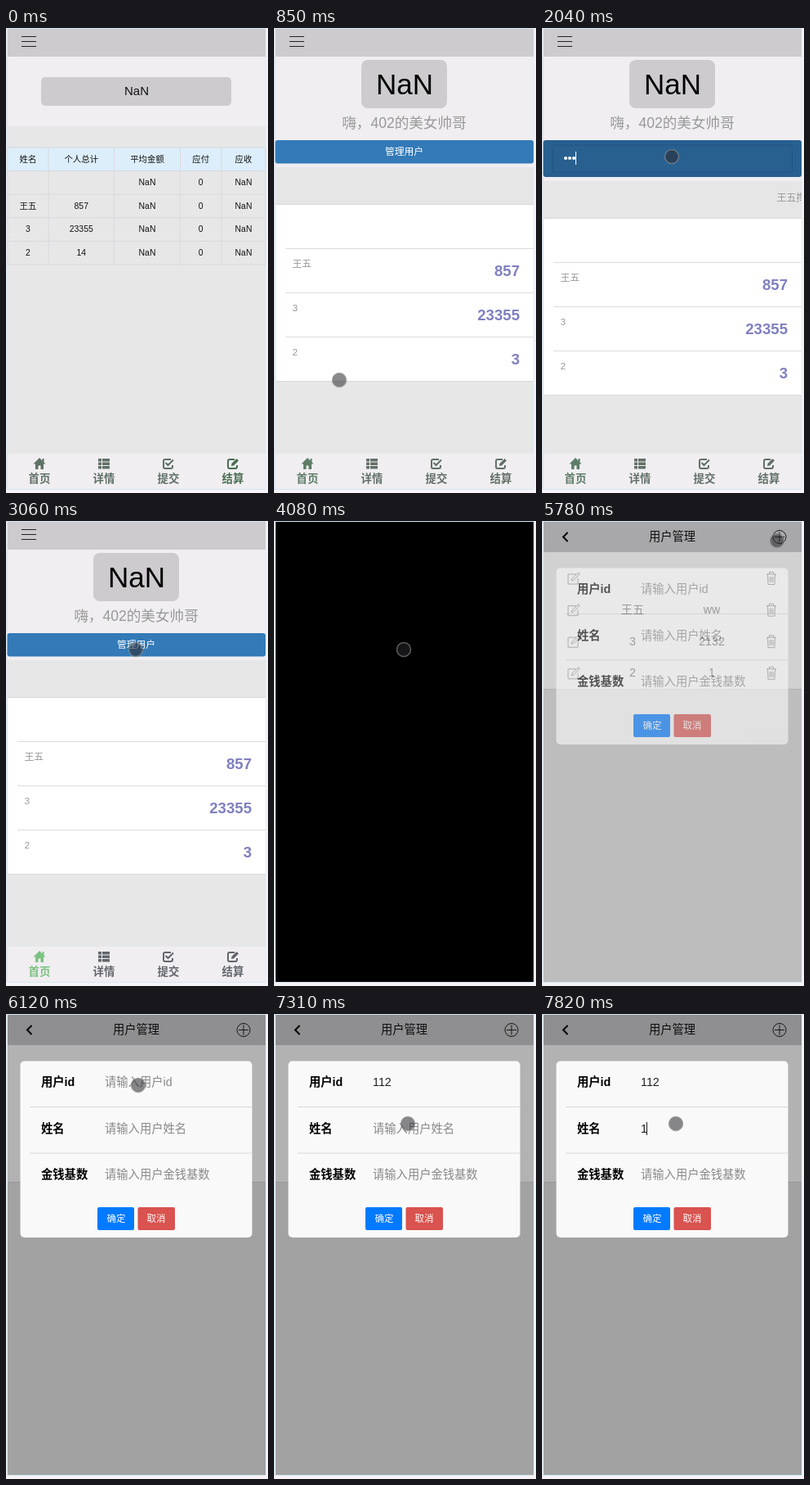
An HTML page for the animation above (8 s loop, 321 by 568 pixels).

```html
<!DOCTYPE html>
<html lang="zh-CN">
<head>
<meta charset="utf-8">
<title>用户管理</title>
<style>
  html, body { margin: 0; width: 100%; height: 100%; overflow: hidden; background: #f7f3f7; }
  svg { display: block; width: 321px; height: 568px; }
  text { font-family: "Liberation Sans", "Noto Sans CJK SC", sans-serif; white-space: pre; }
</style>
</head>
<body>
<svg id="stage" viewBox="0 0 321 568" xmlns="http://www.w3.org/2000/svg"></svg>
<script>
const LOOP = 8000;
const GREY = '#cdcbce', PALE = '#f0eef1', PAGE = '#e7e7e8', LINE = '#d9d9dc';

// Shape helpers
const rect = (x, y, x2, y2, fill, r = 0, extra = '') =>
  `<rect x="${x}" y="${y}" width="${x2 - x}" height="${y2 - y}" rx="${r}" fill="${fill}" ${extra}/>`;
const line = (d, color, w = 1) =>
  `<path d="${d}" fill="none" stroke="${color}" stroke-width="${w}"/>`;
// y is the visual middle of the text
const text = (s, x, y, size, fill = '#111', anchor = 'middle', weight = 400, id = '') =>
  `<text ${id && `id="${id}"`} x="${x}" y="${y + size * .36}" font-size="${size}" fill="${fill}"` +
  ` text-anchor="${anchor}" font-weight="${weight}">${s}</text>`;
const group = (id, body, extra = '') => `<g id="${id}" ${extra}>${body}</g>`;

const menu = line('M19 10.5H37M19 16.5H37M19 22.5H37', '#222', 1.2);

const icons = [
  '<path fill="currentColor" d="M-7.5 .5L0 -7 3.5 -3.6V-6H5.5V-1.6L7.5 .5H5V7H1.5V2.5H-1.5V7H-5V.5Z"/>',
  [-6, -1.5, 3].map(y => `<path fill="currentColor" d="M-7 ${y}h4v3.5h-4zM-2 ${y}h9v3.5h-9z"/>`).join(''),
  '<path fill="none" stroke="currentColor" stroke-width="2" d="M3 -5H-4Q-6 -5 -6 -3V4Q-6 6 -4 6H3Q5 6 5 4V2M-3.5 -1L-.5 2 6 -4.5"/>',
  '<path fill="none" stroke="currentColor" stroke-width="2" d="M2 -5H-4Q-6 -5 -6 -3V4Q-6 6 -4 6H3Q5 6 5 4V2"/>' +
  '<path fill="currentColor" d="M-2 3L-1.5 0 4.5 -6 7 -3.5 1 2.5Z"/>'
];
const tabs = ['首页', '详情', '提交', '结算'].map((s, i) =>
  `<g class="tab"><g transform="translate(${41 + i * 79} 532)">${icons[i]}</g>` +
  text(s, 41 + i * 79, 550.5, 13.4, 'currentColor', 'middle', 700) + '</g>').join('');

// Settlement page
const cols = [2, 52, 132.5, 213.5, 264, 318];
const rowY = i => 146 + i * 28.6;
const table = [
  ['姓名', '个人总计', '平均金额', '应付', '应收'],
  ['', '', 'NaN', '0', 'NaN'],
  ['王五', '857', 'NaN', '0', 'NaN'],
  ['3', '23355', 'NaN', '0', 'NaN'],
  ['2', '14', 'NaN', '0', 'NaN']
];
const settle = rect(2, 35, 318, 120, PALE) + rect(43, 60, 276, 95, GREY, 5) +
  text('NaN', 160, 77, 15) + rect(2, 146, 318, rowY(1), '#dceefa') +
  [0, 1, 2, 3, 4, 5].map(i => line(`M2 ${rowY(i)}H318M${cols[i]} 146V${rowY(5)}`, LINE)).join('') +
  table.map((row, r) => row.map((s, c) =>
    text(s, (cols[c] + cols[c + 1]) / 2, rowY(r) + 13.8, 10.4)).join('')).join('');

// Home page; the list is laid out below the closed button
const people = [['王五', '857'], ['3', '23355'], ['2', '3']];
const list = rect(2, 170, 318, 216, '#e6e6e7') + line('M2 215.5H318', LINE) +
  '<g clip-path="url(#screen)">' + text('王五掏了857元', 0, 191, 12, '#999', 'start', 400, 'ticker') + '</g>' +
  rect(2, 216, 318, 432, '#fff') + line('M2 431.5H318', LINE) +
  people.map(([name, sum], i) => {
    const y = 269.5 + i * 54;
    return line(`M14 ${y}H318`, '#dcdce0') + text(name, 22.5, y + 18, 11.8, '#999', 'start') +
      text(sum, 301, y + 26.5, 18.6, '#8080c0', 'end', 700);
  }).join('');
const home = rect(2, 35, 318, 187, PALE) + rect(107, 39, 212, 98, GREY, 8) +
  text('NaN', 160, 68, 35, '#000') + text('嗨，402的美女帅哥', 159.5, 115.5, 17.6, '#999') +
  group('list', list) +
  group('button', rect(1.5, 137, 318, 165.5, '#337ab7', 3) + text('管理用户', 159.5, 151, 11.8, '#fff')) +
  group('panel', rect(1.5, 137, 318, 182, '#286090', 3) +
    rect(13, 143, 306.5, 176, 'none', 2, 'stroke="#235580"') +
    [0, 1, 2].map(i => `<circle class="dot" cx="${29 + i * 5}" cy="159" r="2.1" fill="#fff"/>`).join('') +
    `<path id="caret" d="M0 151V167" stroke="#fff"/>`);

// User management page
const edit = y => line(`M42 ${y - 5}H32V${y + 7}H44V${y}M36 ${y + 3}L37 ${y}L45 ${y - 7}L46 ${y - 5}L39 ${y + 2}Z`, '#333', .9);
const bin = y => line(`M275 ${y - 5}H287M278.500 ${y - 5}V${y - 7.500}H283.500V${y - 5}` +
  `M276.500 ${y - 5}L277 ${y + 7.500}H285L285.500 ${y - 5}M279 ${y - 2}V${y + 5}M281 ${y - 2}V${y + 5}M283 ${y - 2}V${y + 5}`, '#333', .9);
const users = [['', ''], ['王五', 'ww'], ['3', '2132'], ['2', '1']];
const manage = rect(2, 1, 318, 38, GREY) + line('M31.5 14L26 19.5 31.5 25', '#000', 2) +
  text('用户管理', 159.5, 18.5, 14.3) +
  '<circle cx="291" cy="19.500" r="8" fill="none" stroke="#222"/>' + line('M285 19.5H297M291 13.5V25.5', '#222') +
  rect(2, 38, 318, 205, '#fff') + line('M2 205.5H318', LINE) +
  users.map(([name, base], i) => {
    const y = 70 + i * 38.6;
    return edit(y) + bin(y) + text(name, 111, y - .8, 14.2) + text(base, 208, y - .8, 14.2);
  }).join('');

const fields = [['用户id', '请输入用户id'], ['姓名', '请输入用户姓名'], ['金钱基数', '请输入用户金钱基数']];
const dialog = rect(17.5, 57.5, 301.5, 273, '#f9f9f9', 5) +
  line('M29 113.5H301M29 170H301', '#d8d8da') +
  fields.map(([label], i) => text(label, 43, 83 + i * 56.5, 14.3, '#000', 'start', 700) +
    text('', 121, 83 + i * 56.5, 14.3, '#888', 'start', 400, 'field' + i)).join('') +
  rect(112, 236, 157, 264, '#007aff', 2) + text('确定', 135, 250, 11.5, '#fff') +
  rect(161.5, 236, 207, 264, '#d9534f', 2) + text('取消', 184, 250, 11.5, '#fff') +
  '<path id="bar" d="M128.500 132V148" stroke="#222"/>';

const stage = document.getElementById('stage');
stage.innerHTML =
  '<clipPath id="screen"><rect x="2" y="1" width="316" height="562"/></clipPath>' +
  rect(1, .5, 318, 563.5, PAGE, 0, 'stroke="#d3e8f6"') +
  group('main', rect(2, 1, 318, 35, GREY) + menu + group('settle', settle) + group('home', home) +
    rect(2, 520, 318, 563, PALE) + tabs) +
  group('black', rect(2, 1, 318, 563, '#000')) +
  group('manage', manage) +
  group('shade', rect(2, 1, 318, 563, '#000')) +
  group('dialog', dialog) +
  '<circle id="touch" r="8.500" fill="rgba(40,40,45,.55)" stroke="rgba(140,140,140,.65)" stroke-width="1.500"/>';

const $ = id => document.getElementById(id);
const show = (el, on) => el.style.display = on ? '' : 'none';
const dots = [...document.querySelectorAll('.dot')];
const tabEls = [...document.querySelectorAll('.tab')];

// time, scene, touch point, details
const steps = [
  [0, 'settle', null, {}],
  [510, 'home', [41, 540], {}],
  [850, 'home', [80, 430], {}],
  [1020, 'home', [130, 260], {}],
  [1190, 'home', [159, 157], {}],
  [1360, 'home', [159, 157], { dots: 0 }],
  [1700, 'home', [159, 157], { dots: 1, ticker: 312 }],
  [1870, 'home', [159, 157], { dots: 2, ticker: 300 }],
  [2040, 'home', [159, 157], { dots: 3, ticker: 287.5 }],
  [2550, 'home', [159, 157], { dots: 3, ticker: 252 }],
  [2720, 'home', [159, 157], { lit: true }],
  [3060, 'home', [159, 157], { lit: true }],
  [4080, 'black', [159, 157], {}],
  [4420, 'manage', [274, 40], {}],
  [5270, 'manage', [288, 24], {}],
  [5780, 'manage', [288, 24], { shade: .6 }],
  [6120, 'manage', [162, 87], { shade: 1 }],
  [7310, 'manage', [164, 134], { shade: 1, values: ['112'] }],
  [7820, 'manage', [164, 134], { shade: 1, values: ['112', '1'] }]
];

function tabColor(i, scene, lit) {
  if (scene === 'settle') return i === 3 ? '#4a6f53' : '#5f7066';
  if (i === 0) return lit ? '#7cc183' : '#5c7d67';
  return lit ? '#62666c' : '#627068';
}

function render([, scene, touch, o]) {
  const opened = o.dots !== undefined, shade = o.shade || 0, values = o.values || [];
  show($('main'), scene === 'settle' || scene === 'home');
  for (const id of ['settle', 'home', 'black', 'manage']) show($(id), scene === id);
  tabEls.forEach((el, i) => el.style.color = tabColor(i, scene, o.lit));

  show($('button'), !opened);
  show($('panel'), opened);
  $('list').setAttribute('transform', `translate(0 ${opened ? 17 : 0})`);
  $('ticker').setAttribute('x', o.ticker || 330);
  dots.forEach((el, i) => show(el, i < o.dots));
  $('caret').setAttribute('transform', `translate(${26.5 + 5 * (o.dots || 0)} 0)`);

  show($('shade'), shade);
  $('shade').style.opacity = .3 * shade;
  show($('dialog'), shade);
  $('dialog').style.opacity = shade;
  fields.forEach(([, hint], i) => {
    const el = $('field' + i);
    el.textContent = values[i] || hint;
    el.setAttribute('fill', values[i] ? '#222' : '#888');
  });
  show($('bar'), values[1]);

  show($('touch'), touch);
  if (touch) $('touch').setAttribute('transform', `translate(${touch})`);
}

let current;
const start = performance.now();
function tick() {
  const t = (performance.now() - start) % LOOP;
  const step = steps.findLast(s => s[0] <= t);
  if (step !== current) render(current = step);
  requestAnimationFrame(tick);
}
tick();
</script>
</body>
</html>
```
